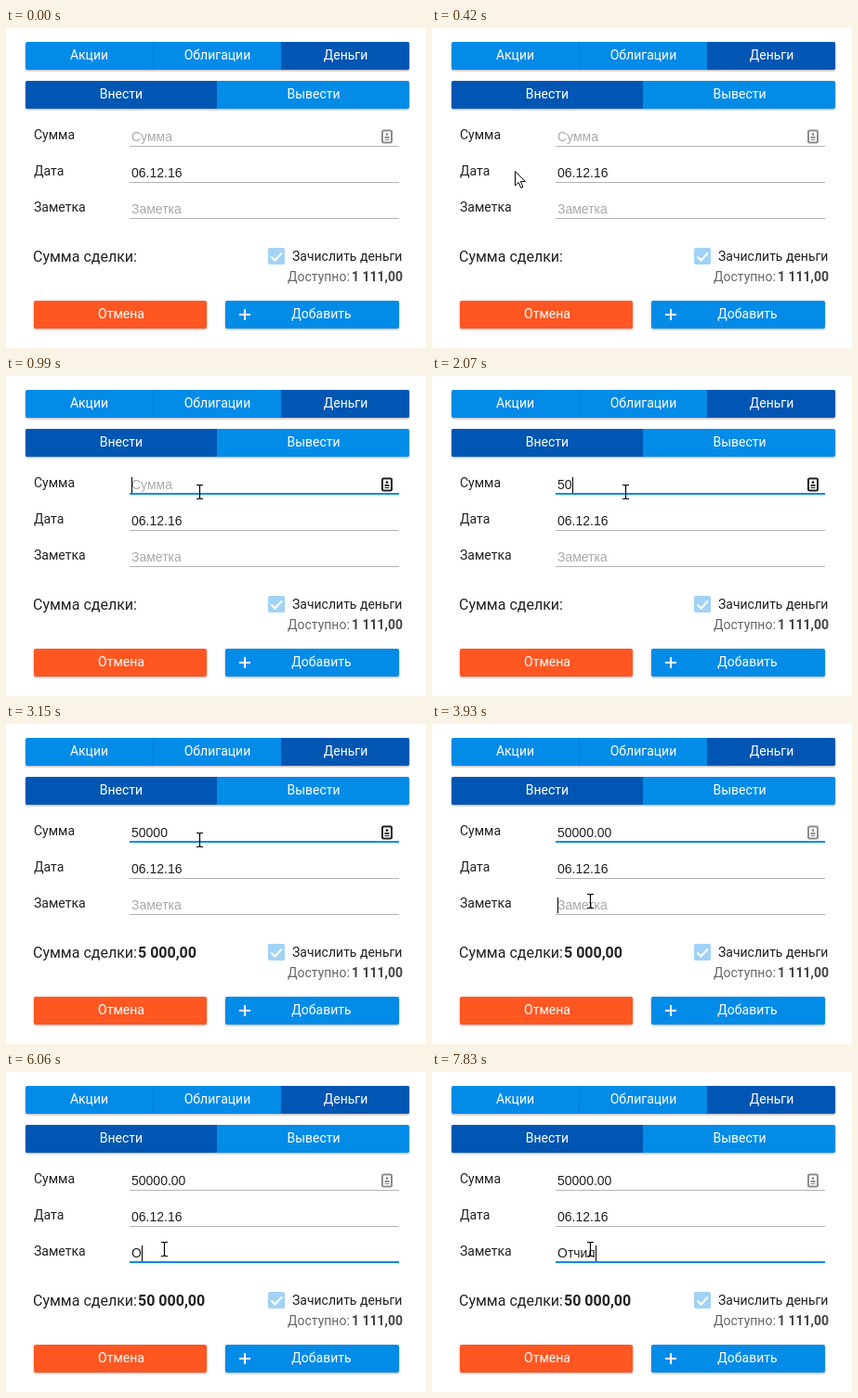
Write an HTML page that moves like this. It is 452 px wide and 345 px high and loops after 8000 ms.

```html
<!DOCTYPE html>
<html lang="ru">
<head>
<meta charset="utf-8">
<style>
  html, body { margin: 0; width: 100%; height: 100%; overflow: hidden; background: #fff; }
  svg { display: block; }
  text { font: 14px Roboto, sans-serif; fill: #212121; white-space: pre; }
  .field { font-family: "Liberation Sans", Arial, sans-serif; }
  .hint { fill: #a9a9a9; }
  .btn { fill: #fff; text-anchor: middle; }
  .big { font-size: 16px; }
  .bold { font-weight: 700; }
  .raised { filter: drop-shadow(0 1px 1px rgba(0, 0, 0, .35)); }
</style>
</head>
<body>
<svg width="452" height="345" viewBox="0 0 452 345">
  <clipPath id="top"><rect x="21" y="15" width="413" height="30" rx="2"/></clipPath>
  <clipPath id="sub"><rect x="21" y="57" width="413" height="30" rx="2"/></clipPath>
  <g class="raised"><g clip-path="url(#top)">
    <path fill="#038be8" d="M21 15h413v30H21z"/>
    <path fill="#0056b2" d="M296 15h138v30H296z"/>
    <path fill="#027bd0" d="M158 15h1v30h-1z"/>
  </g></g>
  <g class="raised"><g clip-path="url(#sub)">
    <path fill="#038be8" d="M21 57h413v30H21z"/>
    <path fill="#0056b2" d="M21 57h206v30H21z"/>
  </g></g>
  <text class="btn" x="89.5" y="34">Акции</text>
  <text class="btn" x="227.5" y="34">Облигации</text>
  <text class="btn" x="365.5" y="34">Деньги</text>
  <text class="btn" x="124" y="76">Внести</text>
  <text class="btn" x="331" y="76">Вывести</text>

  <text x="30" y="120">Сумма</text>
  <text x="30" y="159">Дата</text>
  <text x="30" y="198">Заметка</text>
  <path fill="#b4b4b4" d="M133 127h290v1H133zM133 166h290v1H133zM133 205h290v1H133z"/>
  <path id="sumLine" fill="#038be8" d="M133 126h290v2H133z"/>
  <path id="noteLine" fill="#038be8" d="M133 204h290v2H133z"/>
  <text id="sum" x="135" y="122"></text>
  <text class="field" x="135" y="161">06.12.16</text>
  <text id="note" x="135" y="200"></text>
  <g id="icon">
    <rect x="405" y="110.5" width="10" height="13" rx="1.5" fill="none" stroke="currentColor" stroke-width="2"/>
    <circle cx="410" cy="114.7" r="1.4" fill="currentColor"/>
    <path fill="currentColor" d="M407.5 117h5v2h-5zM407.5 120h5v1h-5z"/>
  </g>

  <text class="big" x="29" y="252">Сумма сделки:</text>
  <text class="big bold" id="total" x="142" y="252"></text>
  <rect x="282" y="237" width="18" height="18" rx="2" fill="#a2d2f5"/>
  <path d="M285.5 246.5l4 4 7.5-8" fill="none" stroke="#fff" stroke-width="2"/>
  <text x="308" y="251">Зачислить деньги</text>
  <text x="303" y="273" style="fill:#666">Доступно:</text>
  <text class="bold" x="427" y="273" text-anchor="end" style="fill:#444">1 111,00</text>

  <rect class="raised" x="30" y="294" width="186" height="30" rx="2" fill="#ff5722"/>
  <rect class="raised" x="236" y="294" width="187" height="30" rx="2" fill="#038be8"/>
  <path d="M251 309h12M257 303v12" stroke="#fff" stroke-width="2"/>
  <text class="btn" x="124" y="313">Отмена</text>
  <text class="btn" x="339.5" y="313">Добавить</text>

  <path id="caret" fill="#000"/>
  <path id="arrow" d="M.5.5v15.5l3.6-3.5 2.6 5.8 2.3-1-2.6-5.7h5z" fill="#fff" stroke="#000"/>
  <path id="beam" d="M-3.5-7.5h2.5l1 1 1-1h2.5M0-7V7M-3.5 7.5h2.5l1-1 1 1h2.5" fill="none" stroke="#000" stroke-width="1.2"/>
</svg>
<script>
const $ = id => document.getElementById(id);
const LOOP = 8000, FOCUS_SUM = 840, FOCUS_NOTE = 3930;

// [time, value]: each value holds until the next one
const sumText = [[0, ''], [1920, '5'], [2070, '50'], [2340, '500'], [2520, '5000'], [2700, '50000'], [FOCUS_NOTE, '50000.00']];
const noteText = [[0, ''], [6060, 'О'], [6900, 'От'], [7560, 'Отч'], [7680, 'Отчи'], [7830, 'Отчил']];
const totalText = [[0, ''], [2430, '50,00'], [2610, '500,00'], [2790, '5 000,00'], [FOCUS_NOTE + 60, '50 000,00']];
const caretOn = [[0, 0], [FOCUS_SUM, 1], [1320, 0], [1770, 1], [3150, 0], [3630, 1], [4410, 0], [4890, 1],
  [5370, 0], [5820, 1], [6570, 0], [6900, 1], [7350, 0], [7560, 1]];
// [time, x, y] of the mouse
const mouse = [[150, 423, 31], [330, 19, 211], [420, 89, 154], [540, 163, 128], [690, 208.5, 125],
  [3570, 208.5, 125], [3690, 170.5, 191], [LOOP, 170.5, 191]];

const at = (steps, t) => steps.findLast(s => s[0] <= t)[1];
const fade = (t, start) => {
  const p = Math.min(1, Math.max(0, (t - start) / 210));
  return 1 - (1 - p) ** 3;
};

function mouseAt(t) {
  const i = mouse.findIndex(m => m[0] > t);
  const [t0, x0, y0] = mouse[i - 1], [t1, x1, y1] = mouse[i];
  const p = (t - t0) / (t1 - t0);
  return [x0 + (x1 - x0) * p, y0 + (y1 - y0) * p];
}

function setField(el, value, hint) {
  el.textContent = value || hint;
  el.setAttribute('class', value ? 'field' : 'field hint');
  return value ? el.getComputedTextLength() : 0;
}

function show(el, visible) {
  el.style.display = visible ? '' : 'none';
}

function drawMouse(t) {
  const shown = t >= 150;
  const [x, y] = shown ? mouseAt(t) : [0, 0];
  const overField = x > 133 && x < 423 && [108, 147, 186].some(top => y > top && y < top + 20);
  show($('arrow'), shown && !overField);
  show($('beam'), shown && overField);
  for (const id of ['arrow', 'beam']) $(id).setAttribute('transform', `translate(${x} ${y})`);
}

function draw(t) {
  const sumWidth = setField($('sum'), at(sumText, t), 'Сумма');
  const noteWidth = setField($('note'), at(noteText, t), 'Заметка');
  $('total').textContent = at(totalText, t);

  const inNote = t >= FOCUS_NOTE;
  const toNote = fade(t, FOCUS_NOTE);
  $('sumLine').style.opacity = fade(t, FOCUS_SUM) * (1 - toNote);
  $('noteLine').style.opacity = toNote;
  $('icon').style.color = t >= FOCUS_SUM && t < 3600 ? '#222' : '#8c8c8c';

  const x = 135 + Math.round(inNote ? noteWidth : sumWidth);
  $('caret').setAttribute('d', `M${x} ${inNote ? 187 : 109}h1v17h-1z`);
  show($('caret'), at(caretOn, t));
  drawMouse(t);
}

function frame() {
  const t = performance.now() % LOOP;
  draw(Math.floor(t / 30) * 30);
  requestAnimationFrame(frame);
}
frame();
</script>
</body>
</html>
```
